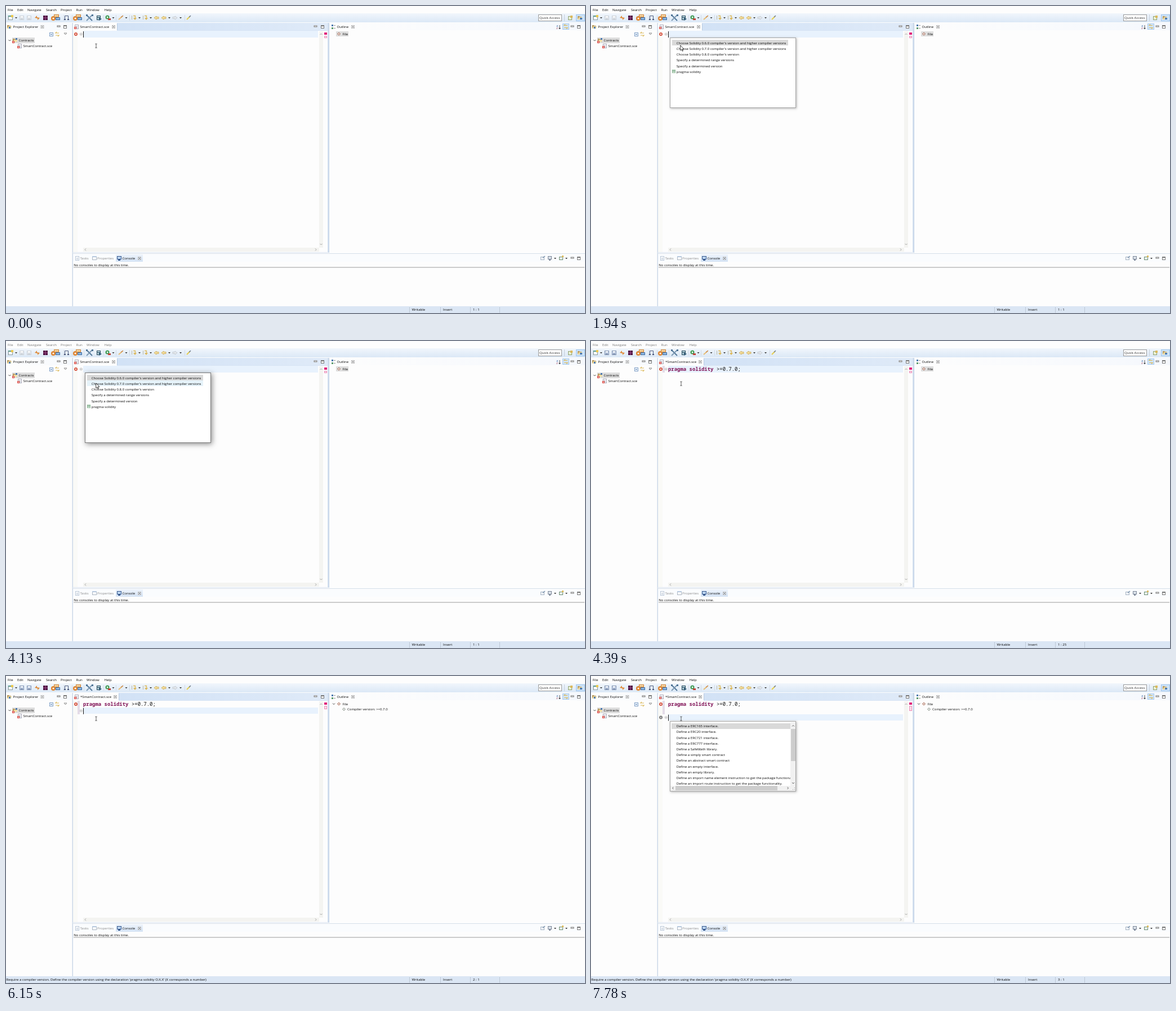
An HTML page with a canvas that plays this animation: 1028x545 px, repeating every 8 s.

```html
<!DOCTYPE html>
<html lang="en">
<head>
<meta charset="utf-8">
<title>Smart contract editor</title>
<style>
html, body { margin: 0; width: 100%; height: 100%; overflow: hidden; background: #fdfdfd; }
canvas { display: block; }
</style>
</head>
<body>
<canvas id="stage" width="1028" height="545"></canvas>
<script>
const c = document.getElementById('stage').getContext('2d');
const UI = '6.06px "Open Sans", "Noto Sans", sans-serif';
const MONO = '8.95px "Noto Sans Mono", "DejaVu Sans Mono", monospace';
const LOOP = 8000;
const GOLD = '#dcb95c', BLUE = '#4a78b0', RED = '#d8403a';

const rect = (x, y, w, h, col) => { c.fillStyle = col; c.fillRect(x, y, w, h); };
const box = (x, y, w, h, col, fill) => {
  if (fill) rect(x, y, w, h, fill);
  c.strokeStyle = col; c.lineWidth = 1;
  c.strokeRect(x + .5, y + .5, w - 1, h - 1);
};
const trace = pts => {
  c.beginPath();
  for (let i = 0; i < pts.length; i += 2) c.lineTo(pts[i], pts[i + 1]);
};
const path = (pts, col, w = 1) => { trace(pts); c.strokeStyle = col; c.lineWidth = w; c.stroke(); };
const poly = (pts, col) => { trace(pts); c.fillStyle = col; c.fill(); };
const disc = (x, y, r, col) => {
  c.beginPath(); c.arc(x, y, r, 0, 7); c.fillStyle = col; c.fill();
};
// y is the middle of the line; the baseline sits on a whole pixel
const text = (s, x, y, col = '#0a0a0a', font = UI) => {
  c.font = font; c.fillStyle = col; c.fillText(s, x, Math.round(y + 2.2));
};
const fade = (x0, y0, x1, y1, a, b) => {
  const g = c.createLinearGradient(x0, y0, x1, y1);
  g.addColorStop(0, a); g.addColorStop(1, b);
  return g;
};

// Small icons, each centred on (x, y)
const drop = (x, y = 21) => poly([x - 2, y - 1, x + 2, y - 1, x, y + 1.3], '#333');
const cross = (x, y) => {
  box(x - 3, y - 3, 6, 6, '#c4c4c4');
  path([x - 2, y - 2, x + 2, y + 2], '#777', .8);
  path([x + 2, y - 2, x - 2, y + 2], '#777', .8);
};
const chevron = (x, y, dir, col = '#555') => {
  const d = { down: [-2, -1, 0, 1, 2, -1], up: [-2, 1, 0, -1, 2, 1],
    left: [1, -2, -1, 0, 1, 2], right: [-1, -2, 1, 0, -1, 2] }[dir];
  path(d.map((v, i) => v + (i % 2 ? y : x)), col, .9);
};
const minMax = (x, y, gap = 12) => {
  box(x - 2.5, y - 1.5, 6, 3, '#777', '#fff');
  box(x + gap - 3, y - 2, 6, 6, '#777', '#fff');
  rect(x + gap - 3, y - 2, 6, 2, '#777');
};
const page = (x, y, col = '#9fb4d0') => {
  box(x - 3, y - 4, 7, 8, col, '#fff');
  rect(x - 1, y - 1, 3, 1, col);
  rect(x - 1, y + 1, 3, 1, col);
};
const badge = (x, y) => { rect(x, y, 4, 4, RED); rect(x + 1, y + 1, 2, 2, '#f7c8c4'); };
const file = (x, y) => { page(x, y, '#a8a8b8'); badge(x - 4, y); };
const folder = (x, y) => {
  poly([x - 4, y - 3, x - 1, y - 3, x, y - 2, x + 3, y - 2, x + 3, y + 3, x - 4, y + 3], '#b8985a');
  poly([x - 2, y - 1, x + 4, y - 1, x + 3, y + 3, x - 4, y + 3], '#f1dfa6');
};
const arrow = (x, y, s, line, fill) => {
  const p = [x - 4 * s, y, x, y - 3, x, y - 1.4, x + 4 * s, y - 1.4, x + 4 * s, y + 1.4, x, y + 1.4, x, y + 3, x - 4 * s, y];
  poly(p, fill || line); path(p, line, .8);
};
const sync = (x, y) => {
  path([x + 3, y - 2, x - 3, y - 2, x - 1, y - 4], GOLD, 1.2);
  path([x - 3, y + 2, x + 3, y + 2, x + 1, y + 4], GOLD, 1.2);
};
const disk = (x, y, on) => {
  box(x - 4, y - 4, 8, 8, on ? '#8294b2' : '#ccd2d9', on ? '#c5d2e6' : '#e4e8ed');
  rect(x - 2, y - 3, 4, 2, '#fff');
  rect(x - 2, y + 1, 4, 2, on ? '#8294b2' : '#ccd2d9');
};
const error = (x, y, col) => {
  disc(x, y, 3, col);
  path([x - 1.2, y - 1.2, x + 1.2, y + 1.2], '#fff', .9);
  path([x + 1.2, y - 1.2, x - 1.2, y + 1.2], '#fff', .9);
};
const fold = y => {
  c.beginPath(); c.arc(133.3, y, 2.2, 0, 7);
  c.fillStyle = '#fff'; c.fill();
  c.strokeStyle = '#b4b4b4'; c.lineWidth = .7; c.stroke();
  path([132, y, 134.6, y], '#888', .8);
};
const gem = (x, y, col) => {
  poly([x, y - 3, x + 3, y, x, y + 3, x - 3, y], col);
  rect(x - 1, y - 1, 2, 2, '#fff');
};
const gears = x => {
  disc(x - 4, 22, 4, '#dd8432'); disc(x - 4, 22, 1.5, '#fff');
  box(x - 3, 15, 9, 5, '#d08030', '#f4d4a0');
  box(x, 20, 8, 5, '#3f6fa5', '#8db4dc');
};

function toolbar(dirty) {
  rect(0, 13, 1028, 16, fade(0, 13, 0, 29, '#f1f6fc', '#dbe8f6'));
  [3, 102, 117, 138, 173, 195, 219, 317].forEach(x => rect(x, 16, 1, 10, '#d3dbe5'));
  box(4, 17, 8, 8, '#8a9a9a', '#f5f8ff'); rect(4, 17, 8, 2, '#5b9a8c');
  rect(9, 16, 4, 4, '#ecc850'); drop(18);
  disk(28, 21, dirty); disk(41, 21, dirty);
  poly([51, 21, 55, 17, 55, 20, 60, 21, 56, 25, 56, 22], '#e08a38');
  rect(66, 17, 8, 8, '#4c1240');
  path([66, 21, 74, 21], '#a04c8c'); path([70, 17, 70, 25], '#a04c8c');
  gears(88);
  path([104.5, 24, 104.5, 17.5, 110.5, 17.5, 110.5, 24], '#4d5a7c');
  rect(103, 23, 3, 2, '#4d5a7c'); rect(109, 23, 3, 2, '#4d5a7c');
  gears(127);
  path([143, 16, 153, 26], '#4f7496', 1.8); path([153, 16, 143, 26], '#7d99b3', 1.8);
  rect(142, 15, 3, 3, '#4f7496'); rect(152, 15, 3, 3, '#4f7496');
  box(161, 17, 7, 8, '#27485a', '#b6d2dc');
  path([161, 20.5, 168, 20.5], '#27485a'); poly([165, 20, 170, 23, 165, 26], '#38607a');
  disc(180, 20, 3.5, '#3f9b55'); poly([179, 18, 182, 20, 179, 22], '#fff');
  rect(181, 22, 5, 3, '#c3443a'); drop(190.5);
  path([200, 24, 207, 18], '#e8bd74', 2); path([204, 20, 208, 17], '#c98a55', 1.5); drop(213.5);
  [227, 247].forEach(x => {
    path([x - 3.5, 17, x - 3.5, 24], '#b9b9a8');
    path([x - 1, 17.5, x + 2.5, 17.5, x + 2.5, 22], GOLD, 1.3);
    poly([x - 1, 21, x + 5, 21, x + 2, 25], GOLD); drop(x + 10);
  });
  arrow(267, 21, 1, '#c9a347', '#f6e3a4'); arrow(280, 21, 1, '#c9a347', '#f6e3a4'); drop(290);
  arrow(300, 21, -1, '#bcc2ca', '#e8ebef'); drop(310);
  path([321, 24, 327, 18], '#e8d050', 2.2); path([325, 20, 328, 17], '#6f7fa0', 1.4);
  box(945, 15, 42, 12, '#999', '#fff'); text('Quick Access', 947, 20.7, '#333');
  rect(991, 15, 1, 12, '#c5ced9');
  box(998, 18, 7, 7, '#8fa070', '#e9f0d4'); rect(1002, 17, 4, 4, GOLD);
  box(1012, 15, 16, 12, '#9cc4ec', '#cfe4f8'); folder(1019, 21); rect(1019, 21, 4, 3, BLUE);
}

function explorer() {
  rect(0, 30, 117, 13, fade(0, 30, 117, 30, '#fdfdfd', '#f6f9fd'));
  folder(6, 37); rect(5, 37, 3, 3, BLUE);
  text('Project Explorer', 12.5, 37); cross(64.5, 37); minMax(93, 36);
  box(77, 47, 7, 7, '#7f9fc6', '#eef4fb'); path([79, 50.5, 82, 50.5], BLUE);
  sync(91, 50);
  path([103, 48, 108, 48, 105.5, 51, 103, 48], '#777', .8);
  chevron(6.5, 61, 'down', '#333');
  rect(11, 56, 40, 10, '#dcdcdc');
  folder(16, 61); badge(11, 62); rect(17, 57, 3, 3, BLUE);
  text('Contracts', 22.5, 61);
  file(24, 71); text('SmartContract.sce', 30.5, 70.8);
}

function editorFrame(dirty) {
  rect(119, 30, 453, 13, fade(119, 0, 572, 0, '#cfe0f5', '#dfeaf8'));
  rect(119, 43, 453, 1, '#d7e4f4');
  const edge = dirty ? 200 : 197;
  rect(119, 30, edge - 119, 14, '#fdfdfd');
  rect(edge, 31, 1, 12, '#b8cbe2');
  file(125, 37);
  text((dirty ? '*' : '') + 'SmartContract.sce', dirty ? 132 : 131.5, 37);
  cross(edge - 6, 37); minMax(549, 36, 13);
  rect(119, 44, 8, 393, '#fafaf7');
  rect(556, 45, 7, 384, '#f4f4f1'); rect(137, 429, 419, 7, '#f4f4f1');
  chevron(559.5, 50, 'up', '#999'); chevron(559.5, 423, 'down', '#999');
  chevron(141, 432.5, 'left', '#999'); chevron(550, 432.5, 'right', '#999');
  rect(117, 30, 1, 503, '#e6ebf2'); rect(118, 30, 1, 503, '#c9d6e7');
  rect(571, 30, 2, 408, '#d2dfef'); rect(573, 30, 1, 408, '#c4d3e6');
  rect(118, 437, 455, 1, '#dce5f1'); rect(118, 439, 910, 1, '#d4deea');
}

function outlineFrame() {
  rect(575, 30, 453, 13, fade(575, 0, 1028, 0, '#fdfdfd', '#f5f8fd'));
  rect(578, 33, 3, 3, BLUE); rect(578, 38, 3, 3, '#5b9a6c');
  path([582, 34.5, 585, 34.5], '#999'); path([582, 39.5, 585, 39.5], '#999');
  text('Outline', 587.5, 37); cross(616, 37);
  text('a', 977, 34.5, BLUE); text('z', 977, 39, '#a04060');
  path([983, 34, 983, 40], '#555'); drop(983, 40);
  box(988, 31, 12, 11, '#a5c9ec', '#d2e5f8');
  sync(994, 36.5);
  minMax(1005, 36);
}

function consoleView() {
  rect(119, 441, 909, 13, '#fafcfe');
  rect(195, 441, 48, 13, fade(0, 441, 0, 454, '#eef4fc', '#d3e2f4'));
  page(126, 448, '#b9c6d6'); text('Tasks', 131.5, 448, '#8c8c8c');
  box(153, 444, 8, 7, '#aab4c0', '#fff'); rect(153, 444, 8, 2, '#b7c9de');
  text('Properties', 162, 448, '#8c8c8c');
  box(197, 444, 8, 6, '#35568c', '#bad3ee'); rect(199, 450, 4, 2, '#35568c');
  text('Console', 206.5, 448); cross(237, 448);
  box(949, 445, 7, 6, '#a9b5c4', '#f0f4f8'); path([953, 447, 957, 444], '#7891ac', 1.5);
  box(962, 444, 7, 6, '#7d8899', '#d9e0e8'); rect(964, 450, 3, 2, '#7d8899'); drop(975, 448);
  box(982, 445, 7, 6, '#6b8b74', '#eef6ee'); rect(987, 443, 3, 3, GOLD); drop(995, 448);
  minMax(1005, 447);
  text('No consoles to display at this time.', 120.3, 459.6);
  rect(120, 463.5, 907, 1, '#999');
}

function status(pos, message) {
  rect(0, 533, 1028, 12, '#dbe6f4');
  [716, 771, 824, 876].forEach(x => {
    for (let y = 535; y < 544; y += 2) rect(x, y, 1, 1, '#9fa9b6');
  });
  text('Writable', 720.5, 539); text('Insert', 776, 539); text(pos, 829, 539);
  if (message) text("Require a compiler version. Define the compiler version using the declaration 'pragma solidity O.X.X' (X corresponds a number)", .5, 539);
}

function panel(x, y, w, h, focused) {
  c.save();
  c.shadowColor = focused ? 'rgba(0,0,0,.45)' : 'rgba(0,0,0,.3)';
  c.shadowBlur = focused ? 9 : 4;
  c.shadowOffsetX = c.shadowOffsetY = focused ? 2 : 1;
  rect(x, y, w, h, '#fff');
  c.restore();
  box(x, y, w, h, focused ? '#777' : '#a6a6a6');
}

const versions = ["Choose Solidity 0.6.0 compiler's version and higher compiler versions",
  "Choose Solidity 0.7.0 compiler's version and higher compiler versions",
  "Choose Solidity 0.8.0 compiler's version", 'Specify a determined range versions',
  'Specify a determined version', 'pragma solidity'];
const templates = ['a ERC165 interface.', 'a ERC20 interface.', 'a ERC721 interface.',
  'a ERC777 interface.', 'a SafeMath library.', 'a simply smart contract',
  'an abstract smart contract', 'an empty interface.', 'an empty library.',
  'an import name element instruction to get the package functionality.',
  'an import route instruction to get the package functionality.'].map(s => 'Define ' + s);

function versionMenu(t) {
  panel(140, 56, 224, 125, t >= 4090);
  const onSecond = t >= 3395, picked = t >= 4250;
  if (!picked) rect(144, 60, 206, 10, t >= 3310 && !onSecond ? '#cbe8f8' : '#d9d9d9');
  if (onSecond) rect(144, 70, 206, 10, picked ? '#cbe8f8' : '#e6f3fa');
  versions.forEach((s, i) => text(s, 151.8, 65.5 + i * 10.2));
  box(144, 113, 6, 6, '#8fb898', '#d6ead9'); rect(145, 115, 4, 1, '#5d9070');
}

function templateMenu() {
  panel(140, 80, 224, 125, false);
  rect(143, 84, 211, 10, '#d9d9d9');
  c.save();
  c.beginPath(); c.rect(141, 81, 213, 114); c.clip();
  templates.forEach((s, i) => text(s, 151.8, 89 + i * 10.2));
  c.restore();
  rect(354, 82, 9, 113, '#f1f1f1'); rect(355, 94, 8, 57, '#cdcdcd');
  rect(141, 195, 222, 9, '#f1f1f1'); rect(150, 195, 181, 8, '#cdcdcd');
  chevron(359, 88.5, 'up'); chevron(359, 190, 'down');
  chevron(145.5, 199, 'left'); chevron(349.5, 199, 'right');
  [[361, 198], [361, 201], [358, 201]].forEach(([x, y]) => rect(x, y, 1, 1, '#999'));
}

function pointer(x, y) {
  const p = [0, 0, 0, 9, 2, 7.2, 3.4, 10.4, 4.8, 9.8, 3.4, 6.7, 6.2, 6.5, 0, 0];
  const at = p.map((v, i) => v + (i % 2 ? y : x));
  poly(at, '#fff'); path(at, '#111', .8);
}
function beam(x, y) {
  path([x, y - 3.5, x, y + 3.5], '#333', .8);
  path([x - 1.8, y - 3.5, x + 1.8, y - 3.5], '#333', .7);
  path([x - 1.8, y + 3.5, x + 1.8, y + 3.5], '#333', .7);
}

// Visible spans of the text caret, in ms
const blinks = [[0, 390], [900, 1440], [1940, 4090], [4430, 5510], [5810, 7230], [7740, LOOP]];

function draw(t) {
  const dirty = t >= 4390, parsed = t >= 4940, outlined = t >= 4730;
  const line = t >= 6190 ? 3 : t >= 5830 ? 2 : 1;
  const y = 50 + (line - 1) * 11.8;
  const menu1 = t >= 860 && t < 4390, menu2 = t >= 7650;

  rect(0, 0, 1028, 545, '#fdfdfd');
  const names = ['File', 3, 'Edit', 20, 'Navigate', 38, 'Search', 71, 'Project', 97, 'Run', 124.5, 'Window', 143, 'Help', 174.5];
  const tint = t >= 4090 && t < 4430 ? '#777' : '#0a0a0a';
  for (let i = 0; i < names.length; i += 2) text(names[i], names[i + 1], 7, tint);
  toolbar(dirty);
  explorer();
  editorFrame(dirty);
  outlineFrame();
  consoleView();
  status(line > 1 ? line + ' : 1' : dirty ? '1 : 25' : '1 : 1', parsed);

  // Code area
  rect(137, Math.round(y - 6), 417, line === 1 ? 12 : 11, '#e8f2fd');
  if (dirty) rect(127, 44, 4, line > 1 ? 24 : 12, '#e4dce8');
  error(124, 50, '#d5533f');
  fold(y);
  if (line === 3) error(124, y, '#777');
  rect(565, 47, 5, 4, '#e0207a');
  box(565, 53, 5, [4, 6, 9][line - 1], '#ec8db8', '#f9dce9');
  if (dirty) {
    text('pragma solidity', 137, 50.8, '#7f1055', 'bold ' + MONO);
    text('>=0.7.0;', 137 + 16 * 5.37, 50.8, '#111', MONO);
  }
  if (blinks.some(([a, b]) => t >= a && t < b))
    rect(line === 1 && dirty ? 266 : 137, y - 5, 1, 11, '#111');

  // Outline tree
  if (!parsed) rect(586, 45, 22, 9, '#dedede');
  if (outlined) chevron(582, 49.5, parsed ? 'down' : 'right', parsed ? '#333' : '#999');
  gem(591, 49.5, '#b5806f');
  text('File', 597.5, 49.3);
  if (parsed) {
    gem(600, 59, '#a0a8a0');
    text('Compiler version: >=0.7.0', 606, 59);
  }

  if (menu1) versionMenu(t);
  if (menu2) templateMenu();
  const move = Math.min(1, Math.max(0, (t - 3310) / 170));
  if (menu1) pointer(158.7 + move, 69.8 + 5 * move);
  else beam(160, 70.7 + 5 * move);
}

function tick() {
  draw(performance.now() % LOOP);
  requestAnimationFrame(tick);
}
tick();
</script>
</body>
</html>
```
